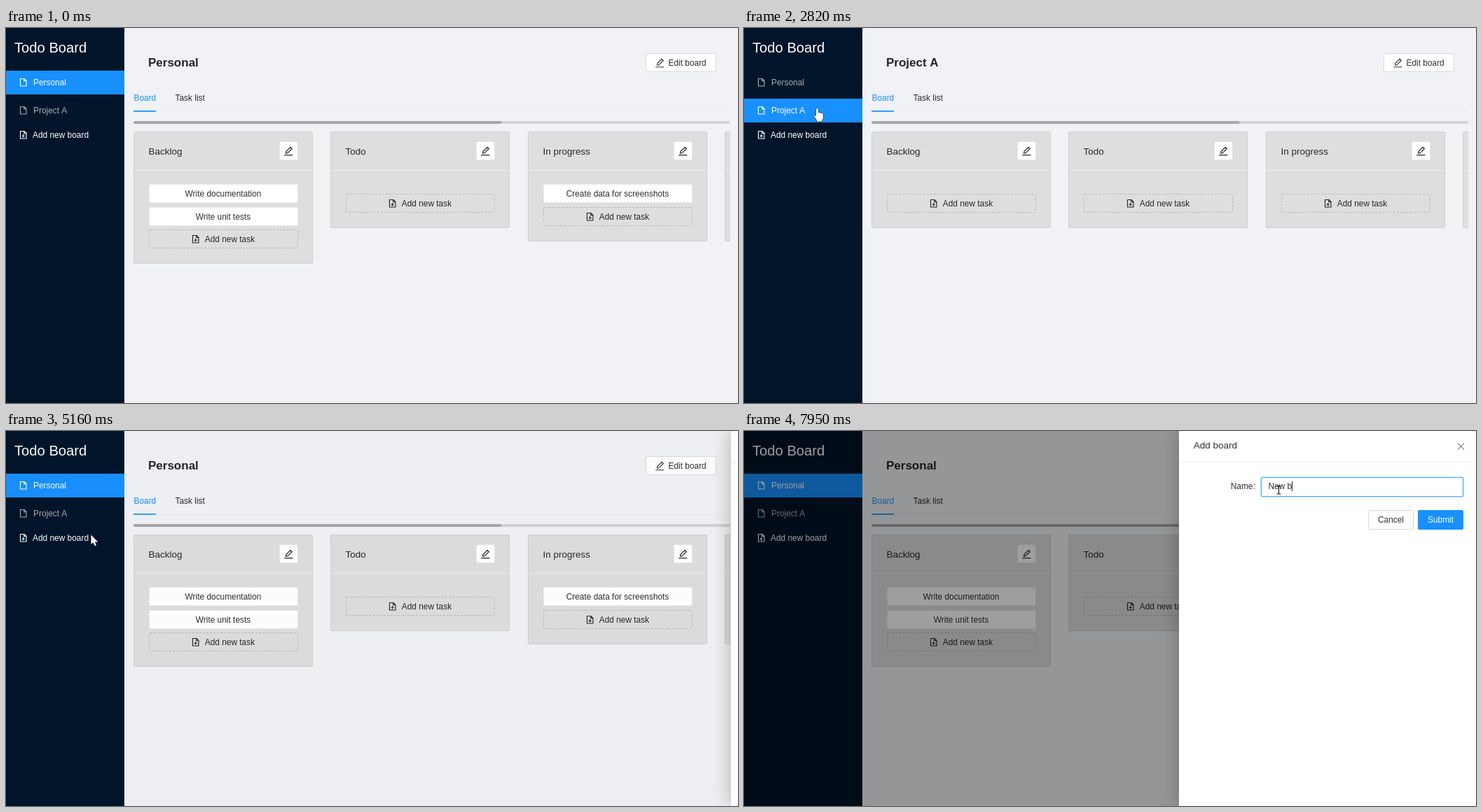
These frames come from a looping animation (1045x536 px, 8000 ms). An HTML page with a canvas:

```html
<!DOCTYPE html>
<html lang="en">
<head>
<meta charset="utf-8">
<title>Todo Board</title>
<style>
html, body { margin: 0; width: 100%; height: 100%; overflow: hidden; background: #f0f2f5; }
canvas { display: block; }
</style>
</head>
<body>
<canvas id="stage" width="1045" height="536"></canvas>
<script>
const c = document.getElementById('stage').getContext('2d');
const LOOP = 8000, BLUE = '#1890ff', INK = 'rgba(0,0,0,.82)', LINE = '#d9d9d9';

const clamp = v => Math.min(1, Math.max(0, v));
const smooth = p => p * p * (3 - 2 * p);
const ramp = (t, start, dur = 300) => smooth(clamp((t - start) / dur));
const within = (t, a, b) => t >= a && t < b;
const white = a => `rgba(255,255,255,${a})`;
const black = a => `rgba(0,0,0,${a})`;

// cubic-bezier(.7, .3, .1, 1)
function easeOut(x) {
  const at = (s, a, b) => 3 * (1 - s) ** 2 * s * a + 3 * (1 - s) * s * s * b + s ** 3;
  let lo = 0, hi = 1;
  for (let i = 0; i < 24; i++) {
    const mid = (lo + hi) / 2;
    if (at(mid, .7, .1) < x) lo = mid; else hi = mid;
  }
  return at(lo, .3, 1);
}

// ---- drawing helpers ----
function text(s, x, y, color = INK, size = 11.9, weight = '', align = 'left') {
  c.font = `${weight} ${size}px "Liberation Sans", Arial, sans-serif`;
  c.textAlign = align;
  c.fillStyle = color;
  c.fillText(s, x, y);
}
function rect(x, y, w, h, color) {
  c.fillStyle = color;
  c.fillRect(x, y, w, h);
}
function box(x, y, w, h, fill, border, dash = [], r = 1.5) {
  c.beginPath();
  c.roundRect(x + .5, y + .5, w - 1, h - 1, r);
  if (fill) { c.fillStyle = fill; c.fill(); }
  c.lineWidth = 1;
  c.strokeStyle = border;
  c.setLineDash(dash);
  c.stroke();
  c.setLineDash([]);
}
function shape(d, x, y, stroke, width = 1.1, fill) {
  const path = new Path2D(d);
  c.save();
  c.translate(x, y);
  c.lineJoin = 'round';
  c.lineWidth = width;
  c.strokeStyle = stroke;
  c.stroke(path);
  if (fill) { c.fillStyle = fill; c.fill(path); }
  c.restore();
}

const FILE = 'M.5.5H6L9 3.5V11H.5ZM5.7.5V3.8H9';
const PLUS = 'M4.7 5V9.4M2.5 7.2H6.9';
const PENCIL = 'M.3 12.2H12.4M2.5 9.7L3 7 9.2.8 11.4 3 5.2 9.2Z';
const ARROW = 'M0 0V13.6L3.1 10.7 5.3 15.8 7.5 14.8 5.4 9.9H9.7Z';
const HAND = 'M-1.5 1Q0-1 1.5 1V6Q3 5.2 4 6.6Q5.5 6 6.4 7.3Q8.3 7 8.5 9V13Q8 15 7 16.5V18.5H-.5V17Q-2.5 14-4.3 11.3Q-5 9.5-3.3 9.7L-1.5 11.5Z';
const IBEAM = 'M-3-5.5H-.8L0-5 .8-5.5H3M0-5V5.5M-3 6H-.8L0 5.5 .8 6H3';

// ---- sidebar ----
function menuItem(label, y, selected, bright) {
  if (selected > 0) {
    c.globalAlpha = selected;
    rect(0, y, 169, 34, BLUE);
    c.globalAlpha = 1;
  }
  const color = white(.65 + .35 * bright);
  shape(FILE, 20, y + 11, color);
  text(label, 39, y + 21, color);
}
function sidebar(t) {
  const onA = ramp(t, 2400) - ramp(t, 3790);
  rect(0, 0, 169, 536, '#001529');
  text('Todo Board', 12, 35, '#fff', 20.2);
  menuItem('Personal', 61, 1 - onA, 1 - ramp(t, 2400) + ramp(t, 3320));
  menuItem('Project A', 101, onA, ramp(t, 1310) - ramp(t, 4580));
  shape(FILE + PLUS, 20, 147, '#fff');
  text('Add new board', 38, 157, '#fff');
}

// ---- board ----
const boards = [
  { title: 'Personal', tasks: [['Write documentation', 'Write unit tests'], [], ['Create data for screenshots'], ['']] },
  { title: 'Project A', tasks: [[], [], [], []] }
];
const columns = ['Backlog', 'Todo', 'In progress', ''];

function column(title, tasks, x) {
  const addY = tasks.length ? Math.round(223.4 + 32.4 * tasks.length) : 237;
  box(x, 148, 256, addY - 99, '#dedede', '#cfcfcf');
  rect(x + 1, 203, 254, 1, '#f0f0f0');
  text(title, x + 21.5, 181, INK, 13.5);
  box(x + 208, 162, 27, 27, '#fff', '#e6e6e6');
  shape(PENCIL, x + 215, 169.5, black(.85), 1.2);
  tasks.forEach((task, i) => {
    const y = Math.round(223.4 + 32.4 * i);
    box(x + 22, y, 213, 27, '#fff', '#ececec');
    text(task, x + 128, y + 18, INK, 11.9, '', 'center');
  });
  box(x + 22, addY, 213, 27, '', '#b9b9b9', [3, 2]);
  shape(FILE + PLUS, x + 84, addY + 8, black(.85));
  text('Add new task', x + 101.7, addY + 18);
}
function board(t) {
  const { title, tasks } = boards[within(t, 2350, 3700) ? 1 : 0];
  rect(169, 0, 876, 536, '#f0f2f5');
  text(title, 203, 55, black(.85), 17, 'bold');
  box(913, 36, 101, 27, '#fff', LINE);
  shape(PENCIL, 927, 43.5, INK, 1.1);
  text('Edit board', 945.5, 54);
  text('Board', 182.5, 104, BLUE);
  text('Task list', 241.5, 104);
  rect(182, 118, 852, 1, '#ededef');
  rect(182, 118, 32, 1.7, BLUE);

  c.save();
  c.beginPath();
  c.rect(182, 125, 852, 400);
  c.clip();
  for (const [w, color] of [[852, '#d3d3d4'], [525.5, '#a8a8aa']]) {
    c.beginPath();
    c.roundRect(182, 133, w, 4, 2);
    c.fillStyle = color;
    c.fill();
  }
  columns.forEach((name, i) => column(name, tasks[i], Math.round(182 + 281.4 * i)));
  c.restore();
}

// ---- drawer ----
const keys = [[7210, 'N'], [7400, 'e'], [7600, 'w'], [7760, ' '], [7950, 'b']];
const FOCUS = 6440;

function input(t, x) {
  const focus = ramp(t, FOCUS, 240);
  if (focus > 0) {
    c.beginPath();
    c.roundRect(x - 1.2, 64.8, 291.4, 30.4, 3);
    c.fillStyle = `rgba(24,144,255,${.2 * focus})`;
    c.fill();
  }
  box(x, 66, 289, 28, '#fff', LINE);
  c.globalAlpha = focus;
  box(x, 66, 289, 28, '', '#40a9ff');
  c.globalAlpha = 1;
  const typed = keys.filter(k => t >= k[0]);
  const value = typed.map(k => k[1]).join('');
  text(value, x + 10.5, 83);
  const since = t - (typed.length ? typed[typed.length - 1][0] : FOCUS);
  if (t >= FOCUS && since % 1000 < 500)
    rect(Math.floor(x + 10.5 + c.measureText(value).width), 72, 1, 14, black(.85));
}
function drawer(t) {
  const p = (t - 5146) / 308;
  if (p < 0) return;
  const slide = easeOut(clamp(p));
  const x = Math.round(1045 - 424 * slide);
  rect(0, 0, 1045, 536, black(.38 * clamp(slide * 1.17)));
  c.save();
  c.shadowColor = black(.2);
  c.shadowBlur = 24;
  c.shadowOffsetX = -4;
  rect(x, 0, 424, 536, '#fff');
  c.restore();
  rect(x, 44, 424, 1, '#efefef');
  text('Add board', x + 20.7, 25, INK, 13.5);
  shape('M-4.5-4.5L4.5 4.5M4.5-4.5L-4.5 4.5', x + 402.5, 22, black(.75 - .3 * ramp(t, FOCUS)), 1.2);
  text('Name', x + 73.7, 83);
  text(':', x + 106, 83);
  input(t, x + 117);
  box(x + 270, 113, 65, 28, '#fff', LINE);
  text('Cancel', x + 302.5, 131, INK, 11.9, '', 'center');
  box(x + 341, 113, 65, 28, '#f5f5f5', LINE);
  const ready = ramp(t, 7210);
  c.globalAlpha = ready;
  box(x + 341, 113, 65, 28, BLUE, BLUE);
  c.globalAlpha = 1;
  text('Submit', x + 373.5, 131, ready > 0 ? white(.4 + .6 * ready) : black(.25), 11.9, '', 'center');
}

// ---- pointer: time, x, y, sideways bend on the way there ----
const path = [
  [590, 210, 461, 0], [1250, 105, 98, 0], [1400, 104.5, 115, 0], [3090, 104.5, 115, 0],
  [3500, 109.5, 81, 0], [3910, 109.5, 81, 0], [4670, 119, 138, 0], [4850, 121.5, 148.5, 0],
  [5320, 121.5, 148.5, 0], [6010, 759, 95, 38], [6120, 759, 95, 0], [6200, 763, 85, 0],
  [6330, 763, 85, 0], [6440, 763.5, 84, 0], [LOOP, 763.5, 84, 0]
];
const clicks = [2220, 3570, 5000, FOCUS];

function pointer(t) {
  if (t < 590) return;
  const i = path.findIndex(k => t < k[0]);
  const [t0, x0, y0] = path[i - 1], [t1, x1, y1, bend] = path[i];
  const p = smooth((t - t0) / (t1 - t0));
  const x = x0 + (x1 - x0) * p;
  const y = y0 + (y1 - y0) * p + bend * Math.sin(Math.PI * p);
  if (clicks.some(k => within(t, k, k + 130))) {
    c.beginPath();
    c.arc(x - .5, y, 10.2, 0, 7);
    c.fillStyle = 'rgba(255,240,0,.52)';
    c.fill();
  }
  if (t >= 6150) shape(IBEAM, x, y, '#111', 1.1);
  else if (x < 169 && y > 60 && y < 135) shape(HAND, x, y, '#111', 1, '#fff');
  else shape(ARROW, x, y, '#111', 1, '#fff');
}

function frame(now) {
  const t = now % LOOP;
  board(t);
  sidebar(t);
  drawer(t);
  pointer(t);
  requestAnimationFrame(frame);
}
requestAnimationFrame(frame);
</script>
</body>
</html>
```
